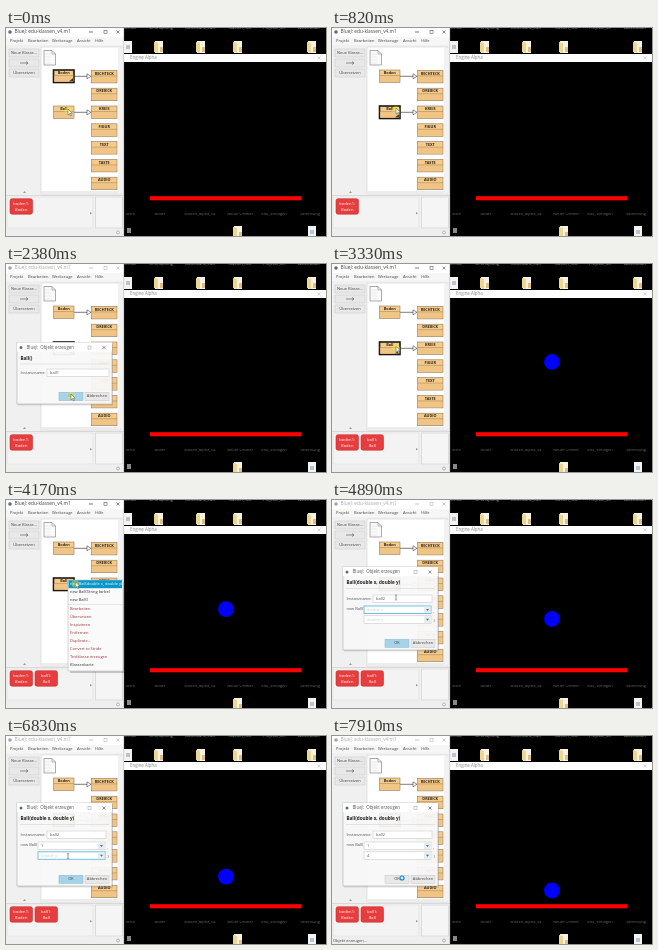
Animation, 320 px wide and 208 px high, one loop 8000 ms. Source, as an HTML page with a canvas:

```html
<!DOCTYPE html>
<html lang="de">
<head>
<meta charset="utf-8">
<title>Ball erzeugen</title>
<style>
  html, body { margin: 0; width: 100%; height: 100%; overflow: hidden; background: #000; }
  canvas { display: block; width: 100%; height: 100%; }
</style>
</head>
<body>
<canvas id="stage" width="320" height="208"></canvas>
<script>
const ctx = document.getElementById('stage').getContext('2d');
const LOOP = 8000;

// Screen updates: [first, last, count], evenly spaced
const updates = [[440, 1380, 8], [1540, 2550, 10], [2630, 3560, 9], [3710, 4720, 10],
  [4890, 5900, 10], [6050, 7060, 10], [7220, 7910, 7]];

// Motion keys: [time, value...]
const cursorPath = [[440, 62, 83], [700, 64, 82], [1000, 66, 85], [1380, 68, 100], [1750, 68, 100],
  [2200, 65, 132], [2500, 65, 132], [3200, 64, 85], [3800, 64, 82], [4200, 70, 84],
  [4450, 70, 85], [4800, 64, 97.5], [5100, 64, 97.5], [5450, 63, 109], [5900, 63, 109],
  [6300, 62, 120], [7220, 62, 120], [7650, 70, 142], [8000, 70, 142]];
const ballPath = [[2500, 87], [3330, 98], [4890, 119], [6830, 140.5], [7910, 154.5], [8000, 155]];

const classNames = ['RECHTECK', 'DREIECK', 'KREIS', 'FIGUR', 'TEXT', 'TASTE', 'AUDIO'];
const menuItems = ['new Ball(double x, double y)', 'new Ball(String farbe)', 'new Ball()',
  'Bearbeiten', 'Übersetzen', 'Inspizieren', 'Entfernen', 'Duplicate...',
  'Convert to Stride', 'Testklasse erzeugen', 'Klassenkarte'];

function heldTime(t) {
  let held = 0;
  for (const [first, last, count] of updates) {
    if (t < first) break;
    const step = (last - first) / (count - 1);
    held = Math.min(last, first + Math.floor((t - first) / step + 0.1) * step);
  }
  return held;
}

function along(keys, t) {
  if (t <= keys[0][0]) return keys[0].slice(1);
  const i = keys.findIndex(k => k[0] >= t);
  const a = keys[i - 1], b = keys[i], p = (t - a[0]) / (b[0] - a[0]);
  return a.slice(1).map((v, n) => v + (b[n + 1] - v) * p);
}

const simpleDialogOpen = t => t >= 1750 && t < 2430;
const parameterDialogOpen = t => t >= 4380;

function rect(x, y, w, h, fill, border, width = 0.6) {
  ctx.fillStyle = fill;
  ctx.fillRect(x, y, w, h);
  if (border) {
    ctx.strokeStyle = border;
    ctx.lineWidth = width;
    ctx.strokeRect(x, y, w, h);
  }
}

function line(points, color, width = 0.7) {
  ctx.beginPath();
  points.forEach(([x, y]) => ctx.lineTo(x, y));
  ctx.strokeStyle = color;
  ctx.lineWidth = width;
  ctx.stroke();
}

function shape(points, fill, border) {
  ctx.beginPath();
  points.forEach(([x, y]) => ctx.lineTo(x, y));
  ctx.closePath();
  ctx.fillStyle = fill;
  ctx.fill();
  if (border) {
    ctx.strokeStyle = border;
    ctx.lineWidth = 0.6;
    ctx.stroke();
  }
}

function disc(x, y, r, fill) {
  ctx.beginPath();
  ctx.arc(x, y, r, 0, 7);
  ctx.fillStyle = fill;
  ctx.fill();
}

function ring(x, y, r, color, width) {
  ctx.beginPath();
  ctx.arc(x, y, r, 0, 7);
  ctx.strokeStyle = color;
  ctx.lineWidth = width;
  ctx.stroke();
}

function label(text, x, y, color = '#333', size = 4, weight = 400, align = 'left') {
  ctx.font = `${weight} ${size}px "Open Sans", sans-serif`;
  ctx.textAlign = align;
  ctx.textBaseline = 'middle';
  ctx.fillStyle = color;
  ctx.fillText(text, x, y);
}

function cross(x, y, color = '#444') {
  line([[x - 1.5, y - 1.5], [x + 1.5, y + 1.5]], color, 0.6);
  line([[x - 1.5, y + 1.5], [x + 1.5, y - 1.5]], color, 0.6);
}

function button(text, x, y, w, h, primary) {
  rect(x, y, w, h, primary ? '#a5d3e8' : '#e8e8e8', primary ? '#8cc0d8' : '#ccc');
  label(text, x + w / 2, y + h / 2, '#444', 4, 400, 'center');
}

function folder(x, y) {
  rect(x - 4, y - 6, 8, 12, '#f6f3e6');
  shape([[x - 5, y - 5], [x - 1, y - 4], [x - 1, y + 6], [x - 5, y + 5]], '#ecd690');
  rect(x + 1, y, 3, 5, '#dcc27a');
}

function page(x, y) {
  rect(x - 4, y - 6, 8, 12, '#f4f4f4');
  rect(x - 2, y - 2, 4, 4, '#b9c4cc');
}

function desktop() {
  rect(118, 0, 202, 208, '#000');
  [['Schule', 124], ['Verknüpfung', 155], ['Datenbank_edu', 194], ['Klassen_neu', 234],
    ['Projekte_alt', 268], ['Arbeitsblatt', 303]]
    .forEach(([name, x]) => label(name, x, 0, '#999', 4, 400, 'center'));
  page(122, 19);
  [153, 195, 232, 306].forEach(x => folder(x, 19));
  [['Texte', 124], ['Bilder', 154], ['wissen_alpha_v4', 194], ['Neuer Ordner', 234],
    ['edu_Vorlagen', 268], ['Sammlung', 304]]
    .forEach(([name, x]) => label(name, x, 186, '#666', 4, 400, 'center'));
  rect(121, 200, 4, 5, '#888');
  folder(232, 204);
  page(306, 204);
}

function gameWindow(t) {
  rect(118, 34, 202, 151, '#000');
  rect(118, 26, 202, 8, '#fdfdfd');
  label('Engine Alpha', 124, 30, '#888', 4.4);
  cross(313, 30, '#bbb');
  rect(144, 168.2, 151, 4.1, '#f00');
  if (t >= 2500) disc(220, along(ballPath, t)[0], 7.9, '#00f');
}

function classBox(name, x, y, w, selected) {
  rect(x, y, w, 12.5, '#f4cb8c', selected ? '#1c1710' : '#94795a', selected ? 1.6 : 0.6);
  rect(x + 0.8, y + 6, w - 1.6, 5.7, '#efc484');
  line([[x, y + 5.5], [x + w, y + 5.5]], '#a27d4d', 0.5);
  label(name, x + w / 2, y + 3.2, '#2e2418', 3.8, 700, 'center');
  if (selected) shape([[x + w - 5, y + 11.5], [x + w - 1, y + 8], [x + w - 1, y + 11.5]], '#4b3b25');
}

function inheritance(y) {
  line([[68, y], [81, y]], '#444');
  shape([[81, y - 2.5], [85, y], [81, y + 2.5]], '#fff', '#444');
}

function objectBox(first, second, x) {
  ctx.beginPath();
  ctx.roundRect(x, 170.7, 22.5, 15.5, 2);
  ctx.fillStyle = '#e63e3e';
  ctx.fill();
  ctx.strokeStyle = '#c43030';
  ctx.lineWidth = 0.6;
  ctx.stroke();
  label(first, x + 11.2, 176, '#fff', 4.1, 400, 'center');
  label(second, x + 11.2, 182, '#fff', 4.1, 400, 'center');
}

function ideWindow(t) {
  const active = !simpleDialogOpen(t) && !parameterDialogOpen(t);
  const ink = active ? '#444' : '#aaa';
  rect(0, 0, 118, 208, '#f0f0f0');
  rect(0, 0, 118, 9, '#fff');
  disc(4, 4, 1.8, active ? '#5b6c86' : '#9aa5b5');
  label('BlueJ: edu-klassen_v4.m1', 8.5, 4, ink, 4.8);
  line([[83, 4], [87, 4]], ink);
  rect(98, 2.5, 3, 3, '#fff', ink, 0.5);
  cross(112, 4, ink);
  rect(0, 9, 118, 8, '#f6f6f6');
  [['Projekt', 4], ['Bearbeiten', 22], ['Werkzeuge', 46], ['Ansicht', 71], ['Hilfe', 89]]
    .forEach(([name, x]) => label(name, x, 13, '#444', 4));

  button('Neue Klasse...', 3, 21, 30, 8);
  button('', 3, 31, 30, 8);
  line([[14, 35], [22, 35]], '#666');
  line([[20, 33.5], [22, 35], [20, 36.5]], '#666');
  button('Übersetzen', 3, 41, 30, 8);
  shape([[17, 165], [18.5, 163], [20, 165]], '#999');

  rect(35, 19, 80, 147, '#fff', '#d0d0d0');
  rect(112, 20, 4, 145, '#f2f2f2');
  rect(35, 163, 77, 3, '#ececec');
  shape([[38, 22.5], [46, 22.5], [49.5, 26], [49.5, 37], [38, 37]], '#fafafa', '#777');
  line([[46, 22.5], [46, 26], [49.5, 26]], '#777', 0.5);
  [26, 29, 32, 35].forEach(y => line([[39.5, y], [45, y]], '#ddd', 0.5));
  inheritance(48.3);
  inheritance(84.3);
  classBox('Boden', 47.5, 42, 20.5, t < 600);
  classBox('Ball', 47.5, 78, 20.5, t >= 600);
  classNames.forEach((name, i) => classBox(name, 85.5, 42.4 + i * 17.8, 25.5, false));

  rect(0, 167, 118, 34, '#f1f1f1');
  line([[0, 167.5], [118, 167.5]], '#d0d0d0');
  rect(1, 169, 86, 31, '#f3f3f3', '#ddd');
  rect(89.5, 169, 27, 31, '#f5f5f5', '#ccc');
  shape([[84, 184], [86, 185.2], [84, 186.4]], '#999');
  objectBox('boden1:', 'Boden', 4);
  if (t >= 2600) objectBox('ball1:', 'Ball', 29);
  rect(0, 201, 118, 7, '#eee');
  ring(112, 204.5, 1.5, '#999', 0.6);
  if (t >= 7780) label('Objekt erzeugen...', 1, 204.5, '#444', 4);
  line([[117.7, 0], [117.7, 208]], '#bbb', 0.6);
}

function contextMenu(cursorY) {
  rect(64, 82, 54, 91, 'rgba(0,0,0,.2)');
  rect(62, 80, 55, 91, '#fafafa', '#bbb');
  const hovered = Math.max(0, Math.floor((cursorY - 80) / 8.15));
  ctx.save();
  ctx.beginPath();
  ctx.rect(62, 80, 54, 91);
  ctx.clip();
  menuItems.forEach((item, i) => {
    const y = 84.2 + i * 8.1;
    if (i === hovered) rect(62.5, y - 4, 53.5, 8, '#0996c9');
    const color = i === hovered ? '#fff' : i > 2 && i < 10 ? '#a03040' : '#333';
    label(item, 64, y, color, 4);
  });
  ctx.restore();
  line([[62, 104.5], [117, 104.5]], '#ccc', 0.5);
}

function dialogFrame(x, y, w, h, heading) {
  rect(x + 1, y + 1.5, w, h, 'rgba(0,0,0,.12)');
  rect(x, y, w, h, 'rgba(250,250,250,.94)', '#aaa');
  rect(x, y, w, 9, '#fff');
  disc(x + 4, y + 5, 1.5, '#5b6c86');
  label('BlueJ:  Objekt erzeugen', x + 9.5, y + 5, '#555', 4.4);
  rect(x + w - 24, y + 3.5, 3, 3, '#fff', '#999', 0.5);
  cross(x + w - 8, y + 5);
  label(heading, x + 3.5, y + 15.8, '#222', 4.6, 700);
  line([[x + 3, y + 21.5], [x + w - 3, y + 21.5]], '#ccc', 0.5);
}

function field(text, x, y, w, h, focused) {
  rect(x, y, w, h, '#fff', focused ? '#74c0e2' : '#ccc', focused ? 1 : 0.6);
  label(text, x + 3, y + h / 2, '#555', 4);
}

function comboBox(text, hint, y, focused) {
  field(text, 32, y, 67, 7.5, focused);
  if (!text) label(hint, 35, y + 3.8, '#ccc', 4);
  rect(92, y + 0.5, 6.5, 6.5, '#e4eef2');
  shape([[94, y + 3], [97, y + 3], [95.5, y + 5]], '#666');
}

function simpleDialog() {
  dialogFrame(11, 78.5, 95, 61.5, 'Ball()');
  label('Instanzname:', 14.5, 109, '#555', 4);
  field('ball1', 41, 105, 62, 7.5, false);
  button('OK', 53, 128.3, 24, 8.2, true);
  button('Abbrechen', 79, 128.3, 24, 8.2);
}

function parameterDialog(t) {
  dialogFrame(11, 67, 95, 83, 'Ball(double x, double y)');
  label('Instanzname:', 14.5, 98.7, '#555', 4);
  field('ball2', 41, 95, 59, 7.5, false);
  label('new Ball(', 14.5, 109, '#555', 4);
  comboBox(t >= 5750 ? '1' : '', 'double x', 106, t < 6300);
  comboBox(t >= 7200 ? '4' : '', 'double y', 115.8, t >= 6300 && t < 7780);
  label(',', 101, 111, '#555', 4);
  label(')', 101.5, 120.5, '#555', 4);
  button('OK', 53, 139.3, 24, 8, t < 7780);
  button('Abbrechen', 79, 139.3, 24, 8);
}

function pointer(t) {
  const [x, y] = along(cursorPath, t);
  if (t >= 4800 && t < 7450) {
    line([[x, y - 2.5], [x, y + 2.5]], '#666', 0.7);
    line([[x - 1.2, y - 2.5], [x + 1.2, y - 2.5]], '#777', 0.5);
    line([[x - 1.2, y + 2.5], [x + 1.2, y + 2.5]], '#777', 0.5);
    return;
  }
  if (t >= 7780) {
    ring(x, y, 2, '#168bd2', 1.2);
    return;
  }
  disc(x, y, 3.8, 'rgba(235,235,40,.45)');
  shape([[x, y - 2], [x, y + 4], [x + 1.5, y + 2.6], [x + 2.5, y + 5],
    [x + 3.4, y + 4.5], [x + 2.4, y + 2.3], [x + 4.2, y + 2.2]], '#fff', '#666');
}

function draw(now) {
  const t = heldTime(now % LOOP);
  ctx.clearRect(0, 0, 320, 208);
  desktop();
  gameWindow(t);
  ideWindow(t);
  if ((t >= 750 && t < 1650) || (t >= 3700 && t < 4280)) contextMenu(along(cursorPath, t)[1]);
  if (simpleDialogOpen(t)) simpleDialog();
  if (parameterDialogOpen(t)) parameterDialog(t);
  pointer(t);
  requestAnimationFrame(draw);
}
requestAnimationFrame(draw);
</script>
</body>
</html>
```
